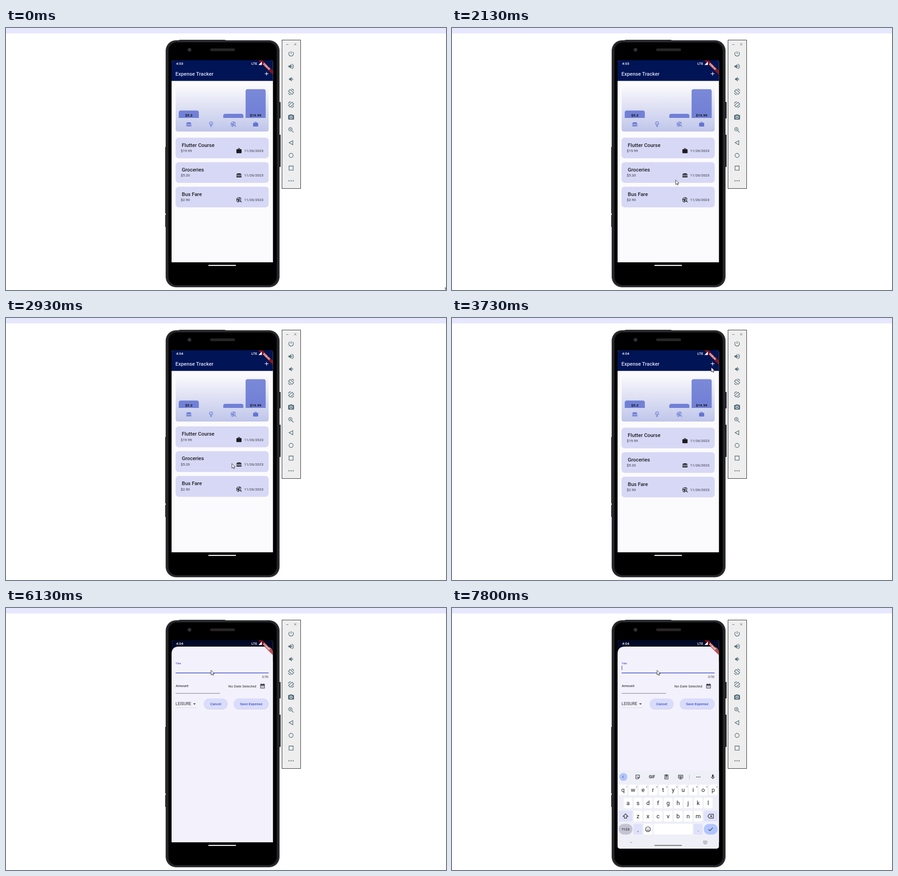
Recreate the animation shown at these times as an HTML page. Size 970 by 577 pixels, loop 8 s.

```html
<!DOCTYPE html>
<html lang="en">
<head>
<meta charset="utf-8">
<title>Expense Tracker demo</title>
<style>
  html, body { margin: 0; width: 100%; height: 100%; overflow: hidden; background: #fff; }
  svg { display: block; width: 970px; height: 577px; }
  text { font-family: Roboto, sans-serif; white-space: pre; }
  symbol { overflow: visible; }
  .line { fill: none; stroke: currentColor; stroke-width: 2; }
</style>
</head>
<body>
<svg id="stage" viewBox="0 0 970 577" xmlns="http://www.w3.org/2000/svg">
  <defs>
    <linearGradient id="chartFill" x1="0" y1="1" x2="0" y2="0">
      <stop stop-color="#4a5fc8" stop-opacity=".34"/><stop offset="1" stop-color="#4a5fc8" stop-opacity="0"/>
    </linearGradient>
    <clipPath id="screen"><path d="M365 516V76q0-5 5-5h213.500q5 0 5 5V516z"/></clipPath>
    <clipPath id="window"><rect x="365" y="300" width="223.500" height="230" rx="5"/></clipPath>

    <symbol id="work" viewBox="0 0 24 24"><path fill="currentColor" fill-rule="evenodd" d="M20 6h-4V4q0-2-2-2h-4q-2 0-2 2v2H4q-2 0-2 2v11q0 2 2 2h16q2 0 2-2V8q0-2-2-2zM14 6h-4V4h4z"/></symbol>
    <symbol id="food" viewBox="0 0 24 24"><path fill="currentColor" d="M2 10C2 6 6 4 12 4s10 2 10 6zM2 16h20v2q0 2-2 2H4q-2 0-2-2z"/><path class="line" d="M2 13.500q1.700-2 3.300-.6t3.400 0 3.300 0 3.300 0 3.400 0 3.300.6"/></symbol>
    <symbol id="leisure" viewBox="0 0 24 24"><circle class="line" cx="12" cy="9" r="6.500"/><path class="line" d="M12 15v8M8.500 19.500h7M9 9.500q3 3.500 6 0"/></symbol>
    <symbol id="travel" viewBox="0 0 24 24"><path class="line" d="M20.500 9.500A9 9 0 1 0 11 21M4 9l6 6v5M15 4v2l-2 2h-3v3H8v2h4"/><circle class="line" cx="15.500" cy="14.500" r="3.500"/><path class="line" d="M18 17l4.500 4.500"/></symbol>
    <symbol id="calendar" viewBox="0 0 24 24"><path fill="currentColor" fill-rule="evenodd" d="M19 4h-1V2h-2v2H8V2H6v2H5Q3 4 3 6v14q0 2 2 2h14q2 0 2-2V6q0-2-2-2zM19 20H5V10h14z"/><path class="line" stroke-dasharray="2 2" d="M7 13h10M7 17h10"/></symbol>

    <symbol id="power" viewBox="0 0 24 24"><path class="line" d="M12 3v10M7 5.800a8 8 0 1 0 10 0"/></symbol>
    <symbol id="volDown" viewBox="0 0 24 24"><path fill="currentColor" d="M5 9v6h4l5 5V4L9 9zM16 8v8q2.500-1.300 2.500-4T16 8z"/></symbol>
    <symbol id="volUp" viewBox="0 0 24 24"><path fill="currentColor" d="M3 9v6h4l5 5V4L7 9zM14 8v8q2.500-1.300 2.500-4T14 8z"/><path class="line" d="M14 4.200a8 8 0 0 1 0 15.600"/></symbol>
    <symbol id="rotate" viewBox="0 0 24 24"><path class="line" d="M8.500 4L21 14.500 15.500 20.500 3 10zM13 2.500q6 0 8.500 6M11 21.500q-6 0-8.500-6"/></symbol>
    <symbol id="camera" viewBox="0 0 24 24"><path fill="currentColor" d="M9 2L7.200 4H4Q2 4 2 6v12q0 2 2 2h16q2 0 2-2V6q0-2-2-2h-3.200L15 2z"/><circle cx="12" cy="12" r="4" fill="none" stroke="#eee" stroke-width="2"/></symbol>
    <symbol id="zoom" viewBox="0 0 24 24"><circle class="line" cx="9.500" cy="9.500" r="5.800"/><path class="line" d="M14 14l6.500 6.500M7 9.500h5M9.500 7v5"/></symbol>
    <symbol id="back" viewBox="0 0 24 24"><path class="line" d="M18 5v14L5 12z"/></symbol>
    <symbol id="home" viewBox="0 0 24 24"><circle class="line" cx="12" cy="12" r="7"/></symbol>
    <symbol id="recent" viewBox="0 0 24 24"><path class="line" d="M5 5h14v14H5z"/></symbol>
    <symbol id="dots" viewBox="0 0 24 24"><path fill="none" stroke="currentColor" stroke-width="4" stroke-linecap="round" d="M5 12h0M12 12h0M19 12h0"/></symbol>

    <symbol id="left" viewBox="0 0 24 24"><path class="line" d="M14.500 6l-6 6 6 6"/></symbol>
    <symbol id="down" viewBox="0 0 24 24"><path class="line" d="M6 9l6 6 6-6"/></symbol>
    <symbol id="sticker" viewBox="0 0 24 24"><path class="line" d="M5 4h14q1 0 1 1v9l-6 6H5q-1 0-1-1V5q0-1 1-1zM20 14h-5v5M8 12q2 4 6 1"/><path class="line" d="M8 8h2M14 8h2"/></symbol>
    <symbol id="clip" viewBox="0 0 24 24"><path class="line" d="M5 4h14v17H5zM8 9.500h8M8 13h8M8 16.500h5"/><path fill="currentColor" d="M8 2h8v5H8z"/></symbol>
    <symbol id="keys" viewBox="0 0 24 24"><path class="line" d="M3 4h18v12H3zM7 20h10M8 13h8"/><path class="line" stroke-dasharray="2 1.500" d="M6 7.500h12M6 10.300h12"/></symbol>
    <symbol id="mic" viewBox="0 0 24 24"><rect x="9" y="2" width="6" height="12" rx="3" fill="currentColor"/><path class="line" d="M6 11a6 6 0 0 0 12 0M12 17v4"/></symbol>
    <symbol id="shift" viewBox="0 0 24 24"><path class="line" d="M12 4l8.500 8.500H16V19H8v-6.500H3.500z"/></symbol>
    <symbol id="erase" viewBox="0 0 24 24"><path class="line" d="M7.500 5H22v14H7.500L2.500 12zM11 9l6 6M17 9l-6 6"/></symbol>
    <symbol id="smile" viewBox="0 0 24 24"><circle class="line" cx="12" cy="12" r="9"/><path class="line" d="M7.500 14q4.500 5 9 0M8 9.500h2M14 9.500h2"/></symbol>
    <symbol id="check" viewBox="0 0 24 24"><path class="line" d="M4 12.500l5 5L20 6.500"/></symbol>
  </defs>

  <rect width="970" height="12" fill="#e7e8fd"/>

  <!-- phone body -->
  <path d="M380 27.500q0-1.500 4-1.500h97q4 0 4 1.500z" fill="#1d1e20"/>
  <path d="M602 163h3.500v36H602zM602 235h3.500v71H602zM351 262h3v150h-3zM351 438h3v-30h-3z" fill="#202124"/>
  <rect x="352" y="27" width="251" height="544" rx="23" fill="#1c1d20"/>
  <rect x="354" y="28.500" width="247" height="541" rx="21.500" fill="none" stroke="#45474b"/>
  <rect x="357.500" y="31" width="240" height="536" rx="19" stroke="#303236"/>
  <circle cx="404.500" cy="48" r="4.300" fill="#29292f"/><circle cx="404.500" cy="48" r="2" fill="#3b3b45"/>
  <rect x="450" y="45" width="55" height="6" rx="3" fill="#272425"/>

  <g clip-path="url(#screen)">
    <rect x="365" y="71" width="224" height="445" fill="#fbfafc"/>
    <rect x="365" y="71" width="224" height="45.500" fill="#001456"/>
    <g id="chart"></g>
    <g id="cards"></g>
    <rect id="scrim" x="365" y="71" width="224" height="445"/>
    <g id="sheet"></g>
    <g transform="translate(588.500 71) rotate(45)">
      <rect x="-24" y="15.500" width="48" height="8.500" fill="#000" opacity=".18"/>
      <rect x="-24" y="16.200" width="48" height="6.800" fill="#b71c1c" opacity=".7"/>
      <text y="21.700" font-size="5.800" font-weight="900" fill="#fff" text-anchor="middle">DEBUG</text>
    </g>
  </g>
  <g fill="#fff">
    <text id="clock" x="375" y="81" font-size="8" font-weight="500"></text>
    <text x="541" y="80.800" font-size="7.800" font-weight="500">LTE</text>
    <path d="M564 74v7.500h-7.500z"/>
  </g>
  <g clip-path="url(#window)"><g id="keyboard"></g></g>
  <rect id="pill" x="446" y="521.800" width="61" height="2.200" rx="1.100"/>

  <g id="tools"></g>
  <path id="arrow" d="M.5.6V10.800L3 8.600 4.600 12 6.200 11.300 4.700 8H7.800z" fill="#fff" stroke="#222" stroke-width=".9"/>
  <path id="beam" d="M0 .5h5M2.500 .5v10M0 10.500h5" fill="none" stroke="#222"/>
</svg>
<script>
const $ = id => document.getElementById(id);
const text = (x, y, size, str, fill = '#1c1c22', weight = 400, anchor = 'start') =>
  `<text x="${x}" y="${y}" font-size="${size}" fill="${fill}" font-weight="${weight}" text-anchor="${anchor}">${str}</text>`;
const rect = (x, y, w, h, r, fill, extra = '') =>
  `<rect x="${x}" y="${y}" width="${w}" height="${h}" rx="${r}" fill="${fill}" ${extra}/>`;
const icon = (id, cx, cy, size, color) =>
  `<use href="#${id}" x="${cx - size / 2}" y="${cy - size / 2}" width="${size}" height="${size}" style="color:${color}"/>`;
const stroke = (d, color, width = 1) => `<path d="${d}" fill="none" stroke="${color}" stroke-width="${width}"/>`;

const BLUE = '#4153c4', INK = '#1c1c22';

function drawChart() {
  const bar = (x, top) => `<path d="M${x} 198V${top + 4.5}q0-4.500 4.500-4.500h35.300q4.500 0 4.500 4.500V198z" fill="#485cca" opacity=".7"/>`;
  $('chart').innerHTML =
    text(373.6, 105, 11.35, 'Expense Tracker', '#dfe1fb', 500) +
    stroke('M570.500 100.700h8M574.500 96.700v8', '#f2f2ff', 1.2) +
    rect(374, 125, 205, 103, 4.5, 'url(#chartFill)') +
    bar(380.8, 181.8) + bar(479, 189) + bar(528.2, 134.8) +
    text(403, 194.8, 8, '$5.2', '#111', 700, 'middle') +
    text(550.3, 194.8, 8, '$19.99', '#111', 700, 'middle') +
    ['food', 'leisure', 'travel', 'work'].map((id, i) => icon(id, 403 + 49.1 * i, 212, 13.5, '#6474d0')).join('');
}

function drawCards() {
  const items = [['Flutter Course', '$19.99', 'work'], ['Groceries', '$5.20', 'food'], ['Bus Fare', '$2.90', 'travel']];
  $('cards').innerHTML = items.map(([title, price, id], i) => {
    const y = 241.5 + 54 * i;
    return rect(373.8, y, 205.2, 45.5, 7, '#d7d8f5') +
      text(387.5, y + 20, 11.35, title, INK, 500) +
      text(385.2, y + 31.8, 8, price, '#33333c') +
      icon(id, 513.6, y + 29, 13.7, INK) +
      text(525, y + 31.8, 8, '11/26/2023', '#33333c');
  }).join('');
}

function drawSheet() {
  const button = (x, w, label) =>
    rect(x, 200.3, w, 23, 11.5, '#b9bbd6', 'opacity=".6"') + rect(x, 199.3, w, 23, 11.5, '#d9dcfb') +
    text(x + w / 2, 213.8, 8, label, BLUE, 500, 'middle');
  $('sheet').innerHTML =
    '<path d="M365 520V101q0-16 16-16h191.500q16 0 16 16V520z" fill="#f3f1fb"/>' +
    '<g id="label"><text id="labelText" font-size="8" font-weight="500">Title</text></g>' +
    '<rect id="underline" x="374" width="205"/>' +
    rect(374, 127, 1.2, 9.5, 0, BLUE, 'id="caret"') +
    text(578.7, 153.8, 6.8, '0/50', '#4a4a52', 400, 'end') +
    text(374, 174, 8, 'Amount', '#404048', 500) +
    stroke('M374 188h98', '#77777e') +
    text(490.3, 174.6, 8, 'No Date Selected', '#2a2a30') +
    icon('calendar', 565.5, 171.8, 13.2, '#33333a') +
    text(373.8, 214.4, 9.1, 'LEISURE', '#2a2a30') +
    '<path d="M412.500 210h6l-3 3z" fill="#44444c"/>' +
    stroke('M374 219.700h47', '#d2d0da', .7) +
    button(436, 52.5, 'Cancel') + button(502, 77, 'Save Expense');
}

function drawKeyboard() {
  const PITCH = 22.1, SOFT = '#dee1f9', DARK = '#303036';
  const letters = (row, cx, top) => [...row].map((c, i) =>
    rect(cx + PITCH * i - 9.5, top, 19, 23.3, 3, '#fff') +
    text(cx + PITCH * i, top + 16, 13, c, INK, 400, 'middle')).join('');
  const digits = [...'1234567890'].map((c, i) => text(385 + PITCH * i, 395.5, 5, c, '#55555c', 400, 'middle')).join('');
  $('keyboard').innerHTML =
    rect(365, 358, 224, 172, 0, '#efeff8') +
    '<circle cx="377.800" cy="372" r="8.800" fill="#b1c5ff"/>' + icon('left', 377.3, 372, 11, DARK) +
    icon('sticker', 409.3, 372, 12.5, DARK) +
    text(440.8, 375.3, 8.8, 'GIF', DARK, 700, 'middle') +
    icon('clip', 472.7, 372, 12.5, DARK) + icon('keys', 504, 372.3, 13, DARK) +
    stroke('M523.500 366v12', '#c8c8d2') +
    icon('dots', 543, 372.3, 12, DARK) + icon('mic', 575, 372, 13, DARK) +
    letters('qwertyuiop', 377, 389) + digits +
    letters('asdfghjkl', 388, 417.8) + letters('zxcvbnm', 410, 446.6) +
    rect(367.3, 446.6, 30.5, 23.3, 3, SOFT) + icon('shift', 382.5, 458.5, 15, DARK) +
    rect(555.2, 446.6, 30.5, 23.3, 3, SOFT) + icon('erase', 570, 458.5, 15, DARK) +
    rect(367.3, 475.4, 30.5, 23.6, 11.8, '#c3c3d3') + text(382.5, 490.3, 8, '?123', DARK, 500, 'middle') +
    rect(400.3, 475.4, 19.3, 23.6, 3, SOFT) + text(410, 492, 11, ',', INK, 400, 'middle') +
    rect(422.5, 475.4, 19.3, 23.6, 3, '#fff') + icon('smile', 432, 487.2, 14.5, DARK) +
    rect(444.3, 475.4, 86, 23.6, 3, '#fff') +
    rect(532.8, 475.4, 19.3, 23.6, 3, SOFT) + text(542.5, 492, 11, '.', INK, 400, 'middle') +
    rect(555.2, 475.4, 30.5, 23.6, 11.8, '#b1c5ff') + icon('check', 570.3, 487.2, 14, DARK) +
    icon('down', 395, 516, 10, '#77777e') + icon('keys', 558.3, 516.5, 10.5, '#8f8f97');
}

function drawTools() {
  const ids = ['power', 'volUp', 'volDown', 'rotate', 'rotate', 'camera', 'zoom', 'back', 'home', 'recent', 'dots'];
  $('tools').innerHTML =
    rect(608.5, 26.5, 41, 327, 0, '#eeeeee', 'stroke="#2b2b2b"') +
    stroke('M618 36.500h4.500M635.300 33.700l4.600 4.600M639.900 33.700l-4.600 4.600', '#5c7380') +
    ids.map((id, i) => {
      const y = 56.7 + 27.98 * i, mark = icon(id, 628.5, y, 15.5, '#546e7b');
      return i === 4 ? `<g transform="translate(1257 0) scale(-1 1)">${mark}</g>` : mark;
    }).join('');
}

const STEP = 1000 / 15, LOOP = 8000;
const pointer = [
  [6, 967, 572], [7, 885, 535], [8, 790, 482], [9, 739, 453], [11, 739, 453],
  [12, 715, 447], [15, 586, 418], [17, 612, 396], [19, 652, 386], [23, 652, 386],
  [24, 610, 358], [25, 535, 312], [26, 497, 292], [27, 497, 292],
  [28, 496, 300], [32, 492.5, 334], [34, 493, 340], [37, 497, 305], [40, 494, 338],
  [42, 494, 342], [44, 497.5, 320], [46, 500, 305], [48, 505, 300], [53, 549, 128],
  [56, 571, 108], [59, 574, 102], [62, 574, 102], [63, 572, 125], [66, 565, 169],
  [72, 565, 169], [73, 558, 165], [78, 465, 141], [81, 451.5, 136.5]
];
const pull = [[34, 0], [37, 1], [40, 0], [42, 0], [44, 1], [46, 1.3], [50, 0]];

const clamp = v => Math.min(1, Math.max(0, v));
const mix = (a, b, p) => a + (b - a) * p;
function sample(table, step) {
  const next = table.findIndex(row => row[0] > step);
  if (next < 0) return table.at(-1).slice(1);
  if (next === 0) return table[0].slice(1);
  const a = table[next - 1], b = table[next], p = (step - a[0]) / (b[0] - a[0]);
  return a.slice(1).map((v, i) => mix(v, b[i + 1], p));
}
// cubic-bezier(0, 0, .2, 1)
function decelerate(x) {
  let lo = 0, hi = 1;
  for (let i = 0; i < 20; i++) {
    const s = (lo + hi) / 2;
    if (.6 * s * s + .4 * s ** 3 < x) lo = s; else hi = s;
  }
  return 3 * lo * lo - 2 * lo ** 3;
}
const show = (id, on) => $(id).setAttribute('visibility', on ? 'visible' : 'hidden');
const move = (id, value) => $(id).setAttribute('transform', value);

function render(elapsed) {
  const step = Math.floor((elapsed % LOOP + 5) / STEP), t = step * STEP;
  const phase = (start, length) => clamp((t - start) / length);

  $('clock').textContent = step < 36 ? '4:03' : '4:04';

  const stretch = 1 + .01 * sample(pull, step)[0];
  move('cards', `translate(0 ${516 * (1 - stretch)}) scale(1 ${stretch})`);

  const opening = phase(4166, 345), open = opening >= 1 ? 1 : decelerate(opening);
  $('scrim').setAttribute('opacity', .54 * opening);
  move('sheet', `translate(0 ${431 * (1 - open)})`);
  show('sheet', open > 0);

  const focus = phase(5700, 160), focused = focus > 0;
  move('label', `translate(373.8 ${mix(129.8, 124.2, focus)}) scale(${mix(1, .75, focus)})`);
  $('labelText').setAttribute('fill', focused ? BLUE : '#404048');
  const thickness = mix(.9, 1.5, focus);
  $('underline').setAttribute('y', 143 - thickness / 2);
  $('underline').setAttribute('height', thickness);
  $('underline').setAttribute('fill', focused ? '#3f50cd' : '#77777e');
  $('caret').setAttribute('opacity', (step >= 86 && step < 92) || step >= 111 ? 1 : 0);

  const rise = 1 - (1 - phase(6600, 600)) ** 3;
  move('keyboard', `translate(0 ${173 * (1 - rise)})`);
  show('keyboard', rise > 0);
  const grey = mix(255, 132, phase(7340, 260));
  $('pill').setAttribute('fill', `rgb(${grey},${grey},${grey})`);

  const [x, y] = sample(pointer, step), overPhone = x > 351 && x < 606;
  show('arrow', overPhone);
  show('beam', !overPhone);
  move(overPhone ? 'arrow' : 'beam', `translate(${x} ${y})`);
}

drawChart();
drawCards();
drawSheet();
drawKeyboard();
drawTools();
const begin = performance.now();
(function tick() {
  render(performance.now() - begin);
  requestAnimationFrame(tick);
})();
</script>
</body>
</html>
```
